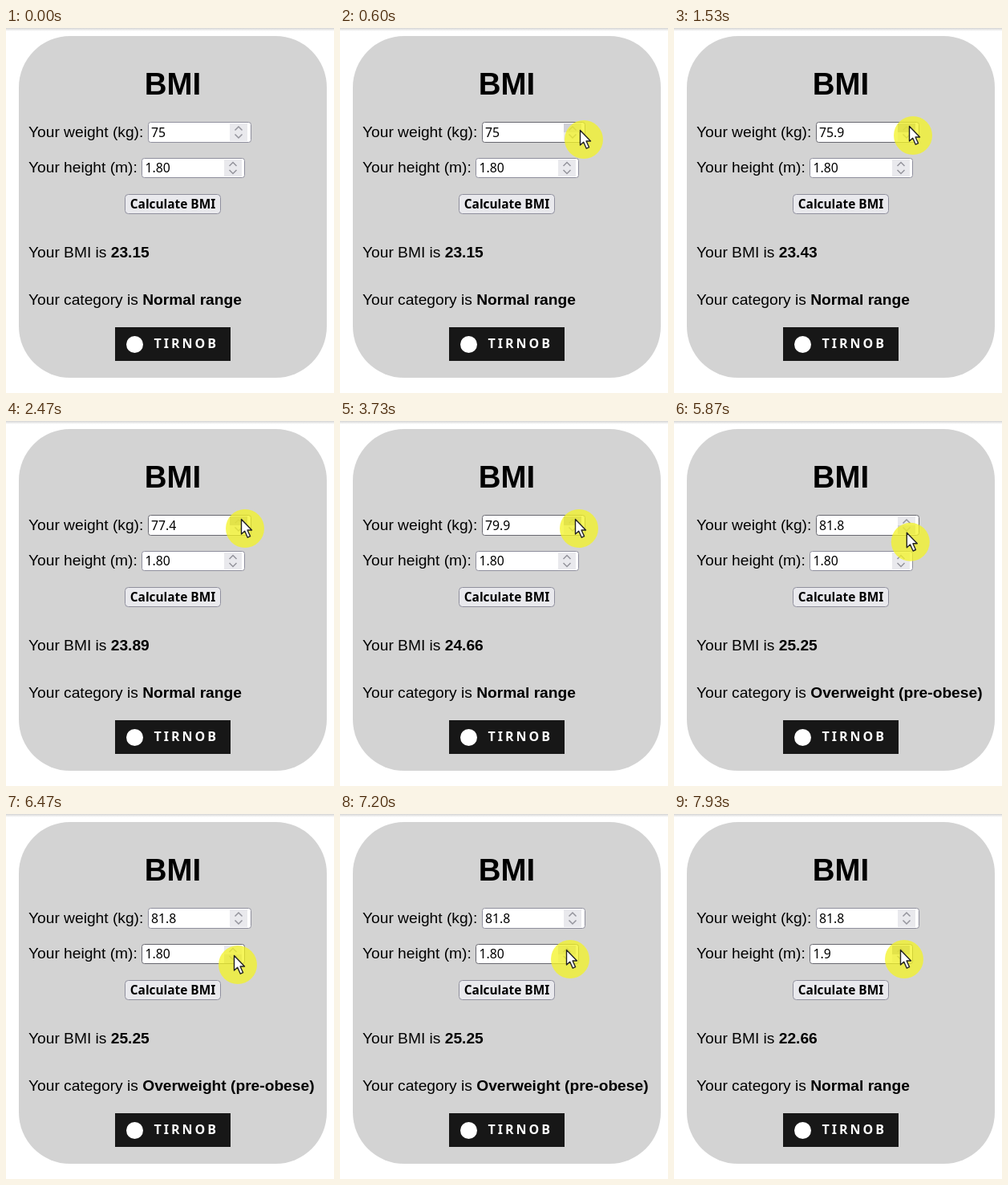
Write an HTML page that moves like this. It is 409 px wide and 455 px high and loops after 8 s.

```html
<!DOCTYPE html>
<html lang="en">
<head>
<meta charset="utf-8">
<title>BMI</title>
<style>
  html, body { margin: 0; width: 100%; height: 100%; overflow: hidden; background: #fff; }
  svg { display: block; width: 409px; height: 455px; }
  text { font: 19.2px "Liberation Sans", Arial, sans-serif; fill: #000; }
  .title { font-size: 38.4px; font-weight: bold; text-anchor: middle; }
  .bold { font-weight: bold; }
  .value { font: 15.8px "Noto Sans", sans-serif; }
  .button { font: bold 15.4px "Noto Sans", sans-serif; text-anchor: middle; }
  .link { font: bold 16px "Noto Sans", sans-serif; letter-spacing: 3px; fill: #fff; }
  .box { fill: #fff; stroke: #8f8f9d; }
  .hover .box { stroke: #67676f; }
  .spin { fill: #e9e9ed; }
  .half { fill: none; }
  .arrows { fill: none; stroke: #94949c; stroke-width: 1.5; }
</style>
</head>
<body>
<svg viewBox="0 0 409 455">
  <defs>
    <linearGradient id="shade" x2="0" y2="1">
      <stop stop-color="#d4d4d4"/>
      <stop offset="1" stop-color="#fff"/>
    </linearGradient>
  </defs>
  <rect width="409" height="4" fill="url(#shade)"/>
  <rect x="16" y="10" width="384" height="426" rx="64" fill="#d3d3d3"/>
  <text class="title" x="208" y="83">BMI</text>

  <text x="28" y="136">Your weight (kg):</text>
  <g id="weight">
    <rect class="box" x="177.5" y="117.5" width="128" height="25" rx="3"/>
    <rect class="spin" x="279" y="119" width="22" height="22"/>
    <rect class="half" x="279" y="119" width="22" height="11"/>
    <path class="arrows" d="M285.5 127.5l4.5-4.5 4.5 4.5M285.5 132.5l4.5 4.5 4.5-4.5"/>
    <text class="value" x="181" y="136">75</text>
  </g>

  <text x="28" y="180">Your height (m):</text>
  <g id="height">
    <rect class="box" x="169.500" y="162.5" width="128" height="24" rx="3"/>
    <rect class="spin" x="272" y="164" width="22" height="21"/>
    <rect class="half" x="272" y="164" width="22" height="11"/>
    <path class="arrows" d="M278.500 172l4.500-4.500 4.500 4.500M278.500 177l4.500 4.500 4.500-4.500"/>
    <text class="value" x="173.500" y="180">1.80</text>
  </g>

  <rect x="148.5" y="207.5" width="119" height="24" rx="4" fill="#e9e9ed" stroke="#8f8f9d"/>
  <text class="button" x="208" y="225">Calculate BMI</text>

  <text x="28" y="286">Your BMI is <tspan class="bold" id="bmi">23.15</tspan></text>
  <text x="28" y="345">Your category is <tspan class="bold" id="category">Normal range</tspan></text>

  <rect x="136" y="373" width="144" height="42" fill="#171717"/>
  <circle cx="160.5" cy="394.5" r="10.5" fill="#fff"/>
  <text class="link" x="184.5" y="399">TIRNOB</text>

  <g id="pointer">
    <circle cx="5" cy="12" r="24" fill="#f4f428" fill-opacity=".76"/>
    <path d="M.5 .5V19l4.200-3.800 3.600 8 3.300-1.500-3.500-7.700H13.500Z" fill="#fff" stroke="#222" stroke-width="1.4" stroke-linejoin="round"/>
  </g>
</svg>
<script>
const LOOP = 8000, TICK = 200 / 3, LAST = 119;
const $ = id => document.getElementById(id);

// Pointer tip: tick, x, y
const path = [
  [0, 440, 116], [1, 420, 116], [4, 350, 121], [7, 304, 126], [9, 299, 127],
  [12, 293, 123], [14, 293, 123], [15, 293, 122], [83, 293, 122], [87, 291, 132],
  [92, 285, 166], [96, 283, 177], [97, 284, 176], [101, 285, 178], [104, 285, 178],
  [108, 282, 169], [LAST, 282, 169]
];

// Each press adds one step, then repeats four steps per three ticks until release
const weightPresses = [
  { down: 16, repeat: 19, up: 24, lead: 2 },
  { down: 27, repeat: 30, up: 59, lead: 1.4 },
  { down: 67, repeat: 70, up: 80, lead: -0.3 }
];
const heightPresses = [{ down: 109, repeat: 113, up: LAST, lead: 0 }];

function steps(presses, n) {
  let sum = 0;
  for (const p of presses) {
    if (n >= p.down) sum++;
    const ticks = Math.min(n, p.up) - p.repeat + 1;
    if (ticks > 0) sum += Math.floor(ticks * 4 / 3 + p.lead + 1e-6);
  }
  return sum;
}

function pointerAt(n) {
  const i = Math.max(1, path.findIndex(p => p[0] >= n));
  const [a, ax, ay] = path[i - 1], [b, bx, by] = path[i];
  const k = (n - a) / (b - a);
  return [ax + (bx - ax) * k, ay + (by - ay) * k];
}

function drawField(id, value, box, presses, n, [px, py]) {
  const field = $(id), half = field.querySelector(".half");
  const [x, y, w, h] = box;
  const over = px >= x && px <= x + w && py >= y && py <= y + h;
  const onSpin = over && px >= x + 102 && px <= x + 125;
  const held = presses.some(p => n >= p.down && n <= p.up);
  field.setAttribute("class", over ? "hover" : "");
  half.setAttribute("y", py < y + h / 2 ? y + 2 : y + 13);
  half.style.fill = onSpin ? (held ? "#b1b1b9" : "#d0d0d7") : "none";
  field.querySelector("text").textContent = value;
}

function draw(n) {
  const tip = pointerAt(n);
  const weight = (750 + steps(weightPresses, n)) / 10;
  const grown = steps(heightPresses, n);
  const height = (180 + grown) / 100;
  const bmi = (weight / height ** 2).toFixed(2);

  drawField("weight", String(weight), [177, 117, 129, 26], weightPresses, n, tip);
  drawField("height", grown ? String(height) : "1.80", [169, 162, 129, 25], heightPresses, n, tip);
  $("bmi").textContent = bmi;
  $("category").textContent = bmi < 25 ? "Normal range" : "Overweight (pre-obese)";
  $("pointer").setAttribute("transform", `translate(${tip[0].toFixed(1)} ${tip[1].toFixed(1)})`);
}

const start = performance.now();
let shown = -1;
function run() {
  const t = (performance.now() - start) % LOOP;
  const n = Math.min(LAST, Math.floor((t + 3.4) / TICK));
  if (n !== shown) draw(shown = n);
  requestAnimationFrame(run);
}
run();
</script>
</body>
</html>
```
